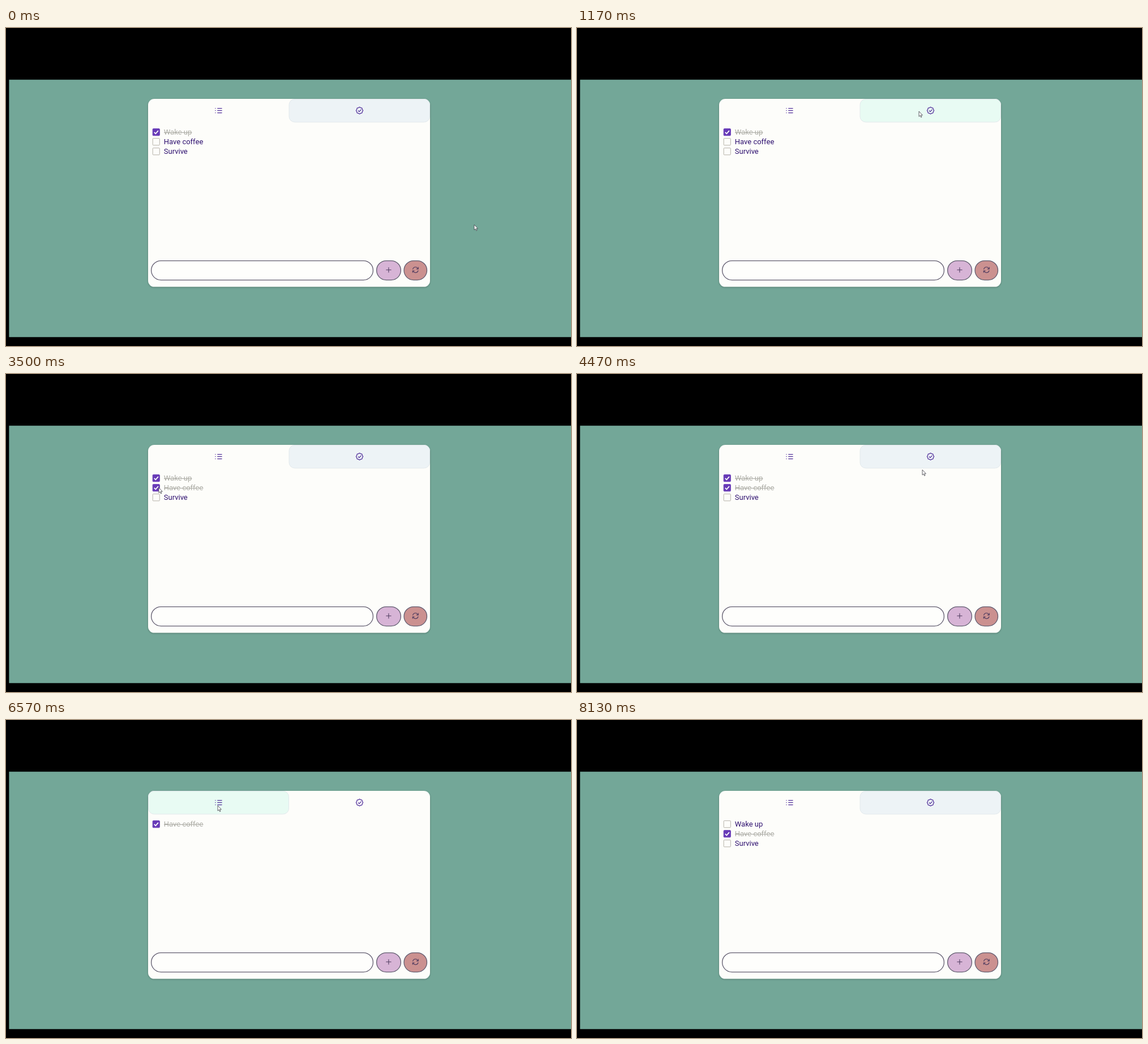
Recreate the animation shown at these times as an HTML page. Size 998 px wide and 561 px high, loop 8.16 s.

```html
<!DOCTYPE html>
<html lang="en">
<head>
<meta charset="utf-8">
<title>To-do list</title>
<style>
  html, body { margin: 0; width: 100%; height: 100%; overflow: hidden; background: #000; }
  svg { display: block; }
  .tab { stroke: #e2e9ec; stroke-width: 1; }
  .icon { fill: none; stroke: #4d2a98; stroke-width: 1.25; stroke-linecap: round; stroke-linejoin: round; }
  .control { stroke: #625d70; stroke-width: 1.3; }
  .glyph { fill: none; stroke: #4d3a5e; stroke-width: 1.05; stroke-linecap: round; stroke-linejoin: round; }
  .row text { font: 13px Roboto, Arial, sans-serif; fill: #2f1170; }
  .row rect { fill: #fdfdfa; stroke: #b5b1a9; }
  .row path { fill: none; stroke: #fff; stroke-width: 1.8; visibility: hidden; }
  .row line { stroke: #a9a9a2; stroke-width: 1; visibility: hidden; }
  .done text { fill: #acaca5; }
  .done rect { fill: #673ab7; stroke: #673ab7; }
  .done path, .done line { visibility: inherit; }
</style>
</head>
<body>
<svg width="998" height="561" viewBox="0 0 998 561">
  <defs>
    <filter id="shadow" x="-5%" y="-5%" width="110%" height="112%">
      <feDropShadow dx="0" dy="1" stdDeviation="1.7" flood-color="#000" flood-opacity=".3"/>
    </filter>
  </defs>
  <rect width="998" height="561"/>
  <rect x="5.4" y="91.2" width="992.6" height="454.1" fill="#73a798"/>
  <rect x="251" y="125" width="498" height="331.6" rx="11" fill="#fdfdfa" filter="url(#shadow)"/>

  <rect class="tab" x="251.5" y="125.5" width="248" height="40.5" rx="10"/>
  <rect class="tab" x="500" y="125.5" width="248.5" height="40.5" rx="10"/>
  <g id="menu"></g>
  <path class="icon" id="badge"/>
  <path class="icon" d="M622.2 145.9l1.7 1.7 3.2-3.5"/>

  <g id="list"></g>

  <rect class="control" x="256.6" y="410.6" width="391.8" height="34" rx="17" fill="#fefefc"/>
  <rect class="control" x="654.6" y="410.6" width="42.8" height="34" rx="17" fill="#d7b4d6"/>
  <rect class="control" x="703" y="410.6" width="40.5" height="34" rx="17" fill="#cb9190"/>
  <path class="glyph" d="M671.7 426.8h8.4M675.9 422.6v8.4"/>
  <path class="glyph" d="M718.6 425.4a4.8 4.8 0 0 1 8.7-1.4M728.3 422.1v3h-3M728 428a4.8 4.8 0 0 1-8.7 1.4M718.3 431.3v-3h3"/>

  <path id="cursor" d="M0 0V9.2L2.1 7.3 3.6 10.6 5 10 3.6 6.8H6.4Z" fill="#fff" stroke="#3c3c44" stroke-width=".8" stroke-linejoin="round"/>
</svg>
<script>
const LOOP = 8160;
const TASKS = ["Wake up", "Have coffee", "Survive"];
const ROW_TOP = 184, ROW_STEP = 17;

const openTab = tab => state => { state.tab = tab; };
const toggle = task => state => { state.done[task] = !state.done[task]; };

// Where the cursor tip is at a time, and what it clicks on arrival
const STOPS = [
  { t: 0, x: 827, y: 347 },
  { t: 1170, x: 604, y: 147 },
  { t: 1320, x: 602, y: 146, click: openTab(1) },
  { t: 2180, x: 398, y: 144, click: openTab(0) },
  { t: 2470, x: 415, y: 130 },
  { t: 3420, x: 264, y: 201, click: toggle(1) },
  { t: 4470, x: 610, y: 169 },
  { t: 4720, x: 620, y: 146, click: openTab(1) },
  { t: 6000, x: 264, y: 184, click: toggle(0) },
  { t: 6570, x: 374, y: 151 },
  { t: 6760, x: 376, y: 148, click: openTab(0) },
  { t: 7470, x: 389, y: 337 },
  { t: 8080, x: 930, y: 92 }
];

const SVG = "http://www.w3.org/2000/svg";
const tabs = [...document.querySelectorAll(".tab")];
const cursor = document.getElementById("cursor");
const list = document.getElementById("list");

function add(parent, tag, attrs) {
  const el = parent.appendChild(document.createElementNS(SVG, tag));
  for (const key in attrs) el.setAttribute(key, attrs[key]);
  return el;
}

for (let i = -1; i <= 1; i++) {
  const y = 145.7 + 3.9 * i;
  add(document.getElementById("menu"), "path", { class: "icon", d: `M369.8 ${y}h.3M373.7 ${y}h7.4` });
}

const rows = TASKS.map(name => {
  const row = add(list, "g", { class: "row" });
  add(row, "rect", { x: 259.2, y: -6.3, width: 12.1, height: 12.1, rx: 1 });
  add(row, "path", { d: "M261.8-.2l2.5 2.7 4.6-5.4" });
  const label = add(row, "text", { x: 278.8, y: 4.3 });
  label.textContent = name;
  add(row, "line", { x1: 279, x2: 279 + label.getComputedTextLength(), y1: .5, y2: .5 });
  return row;
});

// Scalloped outline of the badge
const scallop = Array.from({ length: 96 }, (_, i) => {
  const a = i / 96 * 2 * Math.PI;
  const r = 5.6 + .35 * Math.cos(8 * a);
  return (624.5 + r * Math.cos(a)).toFixed(2) + " " + (145.6 + r * Math.sin(a)).toFixed(2);
});
document.getElementById("badge").setAttribute("d", "M" + scallop.join("L") + "Z");

function cursorAt(t) {
  const i = STOPS.findIndex(stop => stop.t > t);
  if (i < 0) return null;
  const from = STOPS[i - 1], to = STOPS[i];
  const k = (t - from.t) / (to.t - from.t);
  const ease = k * k * (3 - 2 * k);
  return { x: from.x + (to.x - from.x) * ease, y: from.y + (to.y - from.y) * ease };
}

function stateAt(t) {
  const state = { tab: 0, done: [true, false, false] };
  for (const stop of STOPS) if (stop.click && stop.t <= t) stop.click(state);
  return state;
}

function draw(t) {
  const tip = cursorAt(t);
  cursor.style.visibility = tip ? "visible" : "hidden";
  if (tip) cursor.setAttribute("transform", `translate(${tip.x} ${tip.y})`);

  const { tab: active, done } = stateAt(t);
  tabs.forEach((tab, i) => {
    const left = 251 + 249 * i;
    const hover = tip && tip.x >= left && tip.x < left + 249 && tip.y >= 125 && tip.y < 166;
    tab.style.visibility = i === active ? "hidden" : "visible";
    tab.style.fill = hover ? "#e8fbf3" : "#edf3f6";
  });

  let slot = 0;
  rows.forEach((row, i) => {
    const shown = done[i] || active === 0;
    row.classList.toggle("done", done[i]);
    row.style.visibility = shown ? "visible" : "hidden";
    if (shown) row.setAttribute("transform", `translate(0 ${ROW_TOP + ROW_STEP * slot++})`);
  });
}

function tick() {
  draw(performance.now() % LOOP);
  requestAnimationFrame(tick);
}
tick();
</script>
</body>
</html>
```
